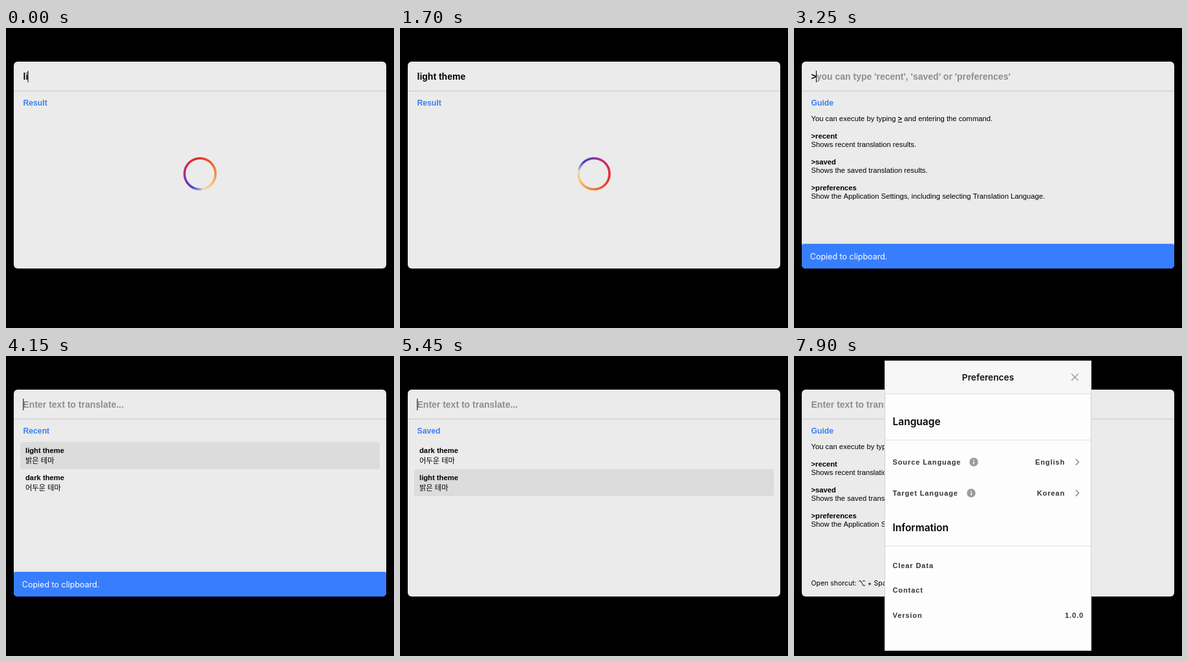
Write an HTML page with a canvas that moves like this. It is 600 px wide and 464 px high and loops after 8000 ms.

```html
<!DOCTYPE html>
<html lang="en">
<head>
<meta charset="utf-8">
<title>Translator</title>
<style>
html, body { margin: 0; width: 100%; height: 100%; overflow: hidden; background: #000; }
canvas { display: block; }
</style>
</head>
<body>
<canvas id="stage" width="600" height="464"></canvas>
<script>
const ctx = document.getElementById('stage').getContext('2d');
const LOOP = 8000;
const SANS = '"Liberation Sans", "Noto Sans CJK KR", "Noto Sans CJK", sans-serif';
const UI = 'Inter, sans-serif';
const FONT = {
  input: `bold 14px ${SANS}`,
  title: `bold 12.2px ${SANS}`,
  body: `11.25px ${SANS}`,
  bold: `bold 11.25px ${SANS}`,
  row: `bold 11px ${SANS}`,
  foot: `10.5px ${UI}`,
  toast: `12.5px ${UI}`,
  head: `600 13.7px ${UI}`,
  section: `600 15.5px ${UI}`
};
const BLUE = '#377eff', PANEL = '#ebebeb';

// Appends one key press per character, after a given prefix.
const keys = (start, step, text, prefix = '') =>
  [...text].map((_, i) => [start + i * step, prefix + text.slice(0, i + 1)]);

const INPUT = [
  [0, 'li'], ...keys(120, 110, 'ght theme', 'li'),
  [2700, ''], [3050, '>'], ...keys(3300, 85, 'recent', '>'),
  [3900, ''], ...keys(4700, 80, '>saved'),
  [5200, ''], [6300, ''], ...keys(6500, 60, '>preferences'),
  [7300, '']
];
const VIEWS = [
  [0, 'loading'], [2000, 'result'], [2700, 'guide'], [3900, 'recent'],
  [4450, 'guide'], [5200, 'saved'], [6300, 'guide']
];
const LIGHT = ['light theme', '밝은 테마'];
const DARK = ['dark theme', '어두운 테마'];

const latest = (list, t) => list.filter(([at]) => at <= t).pop();
const clamp = v => Math.max(0, Math.min(1, v));
const easeOut = v => 1 - (1 - clamp(v)) ** 2;

function text(str, x, y, font, color = '#000', align = 'left', spacing = 0) {
  ctx.font = font;
  ctx.fillStyle = color;
  ctx.textAlign = align;
  ctx.letterSpacing = spacing + 'px';
  ctx.fillText(str, x, y);
  return x + ctx.measureText(str).width;
}

function rect(x, y, w, h, color, radius = 0) {
  ctx.fillStyle = color;
  ctx.beginPath();
  ctx.roundRect(x, y, w, h, radius);
  ctx.fill();
}

function path(points, color, width) {
  ctx.strokeStyle = color;
  ctx.lineWidth = width;
  ctx.beginPath();
  points.forEach(([x, y], i) => i ? ctx.lineTo(x, y) : ctx.moveTo(x, y));
  ctx.stroke();
}

function drawInput(t) {
  const value = latest(INPUT, t)[1];
  const last = latest([...INPUT, [4450, '']].sort((a, b) => a[0] - b[0]), t)[0];
  const end = text(value, 26.5, 80, FONT.input);
  if (!value) text('Enter text to translate...', 26.5, 80, FONT.input, '#8e8e8e');
  if (value === '>') {
    text("you can type 'recent', 'saved' or 'preferences'", end, 80, FONT.input, '#8e8e8e');
  }
  const focused = t < 7300;
  if (focused && (t - last) % 1000 < 500) rect(value ? end - 0.7 : 26.3, 66, 1, 18, '#000');
}

function drawSpinner(t) {
  const start = (82 + t / 1300 * 360) * Math.PI / 180;
  const ring = ctx.createConicGradient(start, 300, 225.5);
  ['#c9bfc8', '#4b40c4', '#7b36ae', '#b92f7d', '#da2b4d', '#ea2c2a', '#ef4a2b',
    '#f3712f', '#f79a4a', '#fbc670', '#e6dccb'].forEach((c, i, all) =>
    ring.addColorStop(i / (all.length - 1), c));
  ctx.strokeStyle = ring;
  ctx.lineWidth = 3.6;
  ctx.beginPath();
  ctx.arc(300, 225.5, 24, 0, Math.PI * 2);
  ctx.stroke();
}

function drawGuide() {
  let x = text('You can execute by typing ', 26.5, 144, FONT.body);
  const after = text('>', x, 144, FONT.bold);
  rect(x, 145, after - x, 1, '#000');
  text(' and entering the command.', after, 144, FONT.body);
  [
    ['>recent', 'Shows recent translation results.'],
    ['>saved', 'Shows the saved translation results.'],
    ['>preferences', 'Show the Application Settings, including selecting Translation Language.']
  ].forEach(([name, info], i) => {
    text(name, 26.5, 171 + i * 40, FONT.bold);
    text(info, 26.5, 184 + i * 40, FONT.body);
  });
  text('Open shorcut:', 26.5, 355.3, FONT.foot);
  path([[100, 348], [103.2, 348], [107, 355], [110, 355]], '#000', 1);
  path([[106, 348], [110, 348]], '#000', 1);
  text('+ Space - First time, you need to restart it.', 113.5, 355.3, FONT.foot);
}

function drawRows(rows, selected) {
  rows.forEach(([source, result], i) => {
    const y = 133 + i * 42;
    if (i === selected) rect(22, y, 556, 42, '#dcdcdc', 4);
    text(source, 30, y + 17, FONT.bold);
    text(result, 30, y + 33, FONT.body);
  });
}

function drawToast(t) {
  const leaving = clamp((t - 4280) / 220);
  const shown = t < 4280 ? easeOut((t - 2700) / 300) : 1 - leaving * leaving;
  if (t < 2700 || shown <= 0) return;
  const y = 372 - 38 * shown;
  ctx.globalAlpha = Math.min(1, shown * 1.15);
  rect(12, y - 1, 576, 1, '#b9cdf5');
  rect(12, y, 576, 38, BLUE, 3);
  text('Copied to clipboard.', 24.8, y + 24.3, FONT.toast, '#fff');
  ctx.globalAlpha = 1;
}

function drawPanel(t) {
  rect(12, 52, 576, 320, PANEL, 6);
  ctx.save();
  ctx.clip();
  rect(12, 97, 576, 1, '#c9c9c9');
  drawInput(t);
  const view = latest(VIEWS, t)[1];
  const title = { guide: 'Guide', recent: 'Recent', saved: 'Saved' }[view] || 'Result';
  text(title, 26.5, 120.4, FONT.title, '#3a80f0');
  if (view === 'loading') drawSpinner(t);
  if (view === 'result') drawRows([LIGHT], 0);
  if (view === 'guide') drawGuide();
  if (view === 'recent') drawRows([LIGHT, DARK], 0);
  if (view === 'saved') drawRows([DARK, LIGHT], t >= 5450 && t < 5950 ? 1 : 0);
  drawToast(t);
  ctx.restore();
}

function infoIcon(x, y) {
  rect(x - 6.7, y - 6.7, 13.4, 13.4, '#9b9b9b', 6.7);
  rect(x - 0.75, y - 3.6, 1.5, 1.5, '#fff');
  rect(x - 0.75, y - 0.9, 1.5, 4.3, '#fff');
}

function drawPreferences(t) {
  if (t < 7350) return;
  ctx.globalAlpha = clamp((t - 7330) / 150);
  rect(140, 7, 320, 449, '#d2d2d2');
  rect(141, 8, 318, 447, '#fdfdfd');
  rect(141, 8, 318, 50, '#f7f7f7');
  [58, 129.5, 293.5].forEach(y => rect(141, y, 318, 1, '#dedede'));
  text('Preferences', 300, 38, FONT.head, '#111', 'center');
  path([[429, 27.5], [439.5, 38]], '#999', 1.4);
  path([[439.5, 27.5], [429, 38]], '#999', 1.4);
  text('Language', 152.5, 106.5, FONT.section);
  text('Information', 152.5, 270.5, FONT.section);

  const item = (label, y) => text(label, 152.5, y, FONT.row, '#333', 'left', 0.9);
  const value = (label, x, y) => text(label, x, y, FONT.row, '#333', 'right', 0.9);
  [['Source Language', 'English', 164, 278], ['Target Language', 'Korean', 212, 274]]
    .forEach(([label, language, y, iconX]) => {
      item(label, y + 4);
      value(language, 419, y + 4);
      infoIcon(iconX, y);
      path([[435.7, y - 4.7], [440.3, y], [435.7, y + 4.7]], '#858585', 1.4);
    });
  item('Clear Data', 328);
  item('Contact', 366);
  item('Version', 404.5);
  value('1.0.0', 448, 404.5);
  ctx.globalAlpha = 1;
}

function frame() {
  const t = performance.now() % LOOP;
  rect(0, 0, 600, 464, '#000');
  drawPanel(t);
  drawPreferences(t);
  requestAnimationFrame(frame);
}
frame();
</script>
</body>
</html>
```
